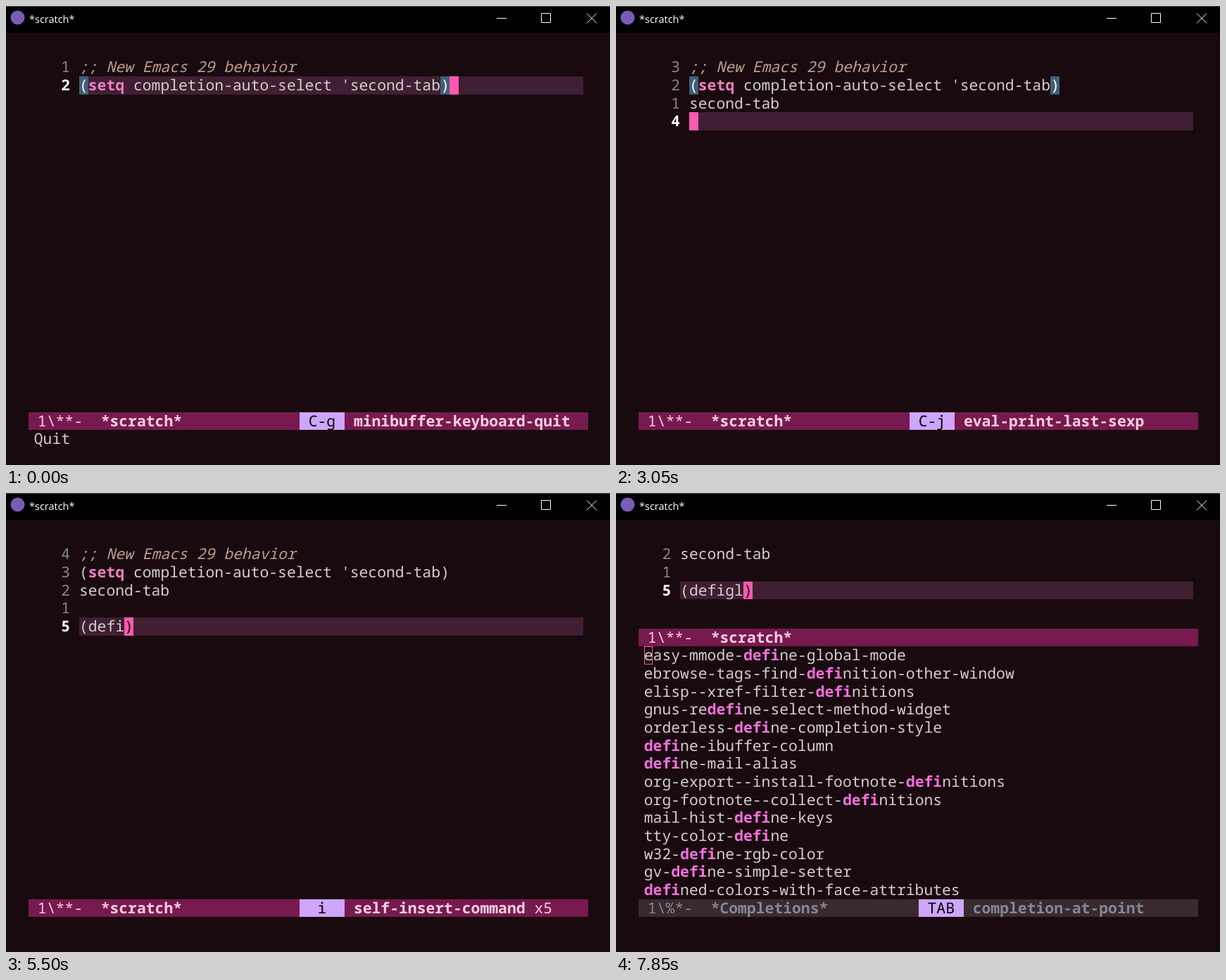
These frames come from a looping animation (858 by 653 pixels, 8000 ms). An HTML page:

```html
<!DOCTYPE html>
<html lang="en">
<head>
<meta charset="utf-8">
<title>*scratch*</title>
<style>
html, body { margin: 0; width: 100%; height: 100%; overflow: hidden; background: #190a0f; }
svg { display: block; }
text { font: 21.38px "Noto Sans Mono", monospace; white-space: pre; fill: #d3cfcf; text-rendering: geometricPrecision; }
.title { font: 14.5px "Open Sans", sans-serif; fill: #fff; }
.b, .kw, .match, .now, .cmd, .idle-b { font-weight: bold; }
.num, .idle, .idle-b { fill: #808898; }
.now, .paren { fill: #fff; }
.note { fill: #bf9f8f; font-style: italic; }
.kw { fill: #ef80bf; }
.match { fill: #f470df; }
.mode, .cmd { fill: #ffcfdf; }
.key { fill: #000; }
.under { fill: #190a0f; }
</style>
</head>
<body>
<svg width="858" height="653" viewBox="0 0 858 653">
  <rect width="858" height="653" fill="#190a0f"/>
  <rect width="858" height="38"/>
  <rect width="858" height="1" fill="#484848"/>
  <circle cx="16.5" cy="16.5" r="10" fill="#7a5cb8"/>
  <text class="title" x="33" y="23.5">*scratch*</text>
  <path d="M697 17.5H711M760.5 10.5H773.5V23.5H760.5ZM825 10.5L839 24.5M839 10.5L825 24.5" fill="none" stroke="#fff"/>
  <g id="view"></g>
</svg>
<script>
const LOOP = 8000, CELL = 12.83, LINE = 25.67, LEFT = 39.8, TOP = 74.3, BAR = 32;
const PINK = '#ff5aaf', PAREN = '#3f5f78';
const view = document.getElementById('view');

const NOTE = [[';; New Emacs 29 behavior', 'note']];
const SETQ = [['('], ['setq', 'kw'], [" completion-auto-select 'second-tab"], [')']];
const SETQ_LIT = SETQ.map(([s, c]) => s === '(' || s === ')' ? [s, 'paren', PAREN] : [s, c]);
const RESULT = [['second-tab']];

const matches = `easy-mmode-define-global-mode
ebrowse-tags-find-definition-other-window
elisp--xref-filter-definitions
gnus-redefine-select-method-widget
orderless-define-completion-style
define-ibuffer-column
define-mail-alias
org-export--install-footnote-definitions
org-footnote--collect-definitions
mail-hist-define-keys
tty-color-define
w32-define-rgb-color
gv-define-simple-setter
defined-colors-with-face-attributes`.split('\n');

const rect = (x, y, w, h, fill) => {
  const l = Math.round(x), t = Math.round(y);
  return `<rect x="${l}" y="${t}" width="${Math.round(x + w) - l}" height="${Math.round(y + h) - t}" fill="${fill}"/>`;
};

// Draws [string, class, background] runs on the character grid.
function runs(x, y, parts) {
  let out = '';
  for (const [s, cls = '', bg] of parts) {
    const w = s.length * CELL;
    if (bg) out += rect(x, y, w, LINE, bg);
    if (s.trim()) out += `<text class="${cls}" x="${x.toFixed(2)}" y="${Math.round(y) + 20}">${s}</text>`;
    x += w;
  }
  return out;
}

// The last line is the current one; others get relative numbers.
function buffer(lines, numCol, current) {
  const last = lines.length - 1;
  return lines.map((parts, i) => {
    const y = TOP + i * LINE, x = LEFT + (numCol + 2) * CELL;
    const here = i === last;
    return (here ? rect(x, y, 820 - x, LINE, '#401f33') : '') +
      runs(LEFT + numCol * CELL, y, [[String(here ? current : last - i), here ? 'now' : 'num']]) +
      runs(x, y, parts);
  }).join('');
}

function modeLine(y, flags, name, idle, keyCol, key, cmd, count) {
  const plain = idle ? 'idle' : 'mode', bold = idle ? 'idle-b' : 'cmd';
  let out = rect(BAR, y, 795, LINE, idle ? '#392a2f' : '#771a4f') +
    runs(BAR, y, [[' '], [flags, plain], ['  '], [name, bold]]);
  if (key) {
    const pad = ' '.repeat((5 - key.length) / 2);
    out += runs(BAR + keyCol * CELL, y,
      [[pad + key + pad, 'key', '#cfa5ff'], [' '], [cmd, bold], [count > 1 ? ' x' + count : '', plain]]);
  }
  return out;
}

const cursor = (on, under = ' ') => on ? [under, 'under', PINK] : [under];
const mainBar = (key, cmd, count) => modeLine(577.5, '1\\**-', '*scratch*', false, 30, key, cmd, count);
const typed = (s, on) => s ? [['(' + s.slice(1)], cursor(on, ')')] : [cursor(on)];

const start = on =>
  buffer([NOTE, [...SETQ_LIT, cursor(on)]], 3, 2) +
  mainBar('C-g', 'minibuffer-keyboard-quit') + runs(LEFT, 603.3, [['Quit']]);

const printed = (on, lit) =>
  buffer([NOTE, lit ? SETQ_LIT : SETQ, RESULT, [cursor(on)]], 3, 4) +
  mainBar('C-j', 'eval-print-last-sexp');

const typing = s =>
  buffer([NOTE, SETQ, RESULT, [], typed(s, true)], 3, 5) +
  (s ? mainBar(s.slice(-1), 'self-insert-command', s.length) : mainBar('RET', 'newline'));

function completing(s, on) {
  const listTop = 218.3;
  const list = matches.map((m, i) => {
    const [a, b] = m.split('defi');
    return runs(LEFT, listTop + i * LINE, [[a], ['defi', 'match'], [b]]);
  }).join('');
  return buffer([RESULT, [], typed(s, on)], 2, 5) +
    modeLine(192.7, '1\\**-', '*scratch*') + list +
    `<rect x="40.5" y="218.5" width="11" height="25" fill="none" stroke="${PINK}"/>` +
    modeLine(577.5, '1\\%*-', '*Completions*', true, 31, 'TAB', 'completion-at-point');
}

const steps = [
  [0, start, true], [380, start, false], [880, start, true], [1380, start, false],
  [1900, start, true], [2400, start, false], [2800, start, true],
  [3050, printed, true, true], [3170, printed, true], [3600, printed, false], [4130, printed, true],
  [4510, typing, ''], [4890, typing, '('], [5140, typing, '(d'], [5260, typing, '(de'],
  [5380, typing, '(def'], [5500, typing, '(defi'],
  [5810, completing, '(defi', true], [6310, completing, '(defi', false],
  [6820, completing, '(defi', true], [7190, completing, '(defi', false],
  [7720, completing, '(defig', true], [7850, completing, '(defigl', true]
];

let shown, origin;
function tick(now) {
  origin ??= now;
  const t = (now - origin) % LOOP;
  const step = steps.findLast(s => s[0] <= t);
  if (step !== shown) {
    const [, draw, ...args] = shown = step;
    view.innerHTML = draw(...args);
  }
  requestAnimationFrame(tick);
}
tick(performance.now());
</script>
</body>
</html>
```
